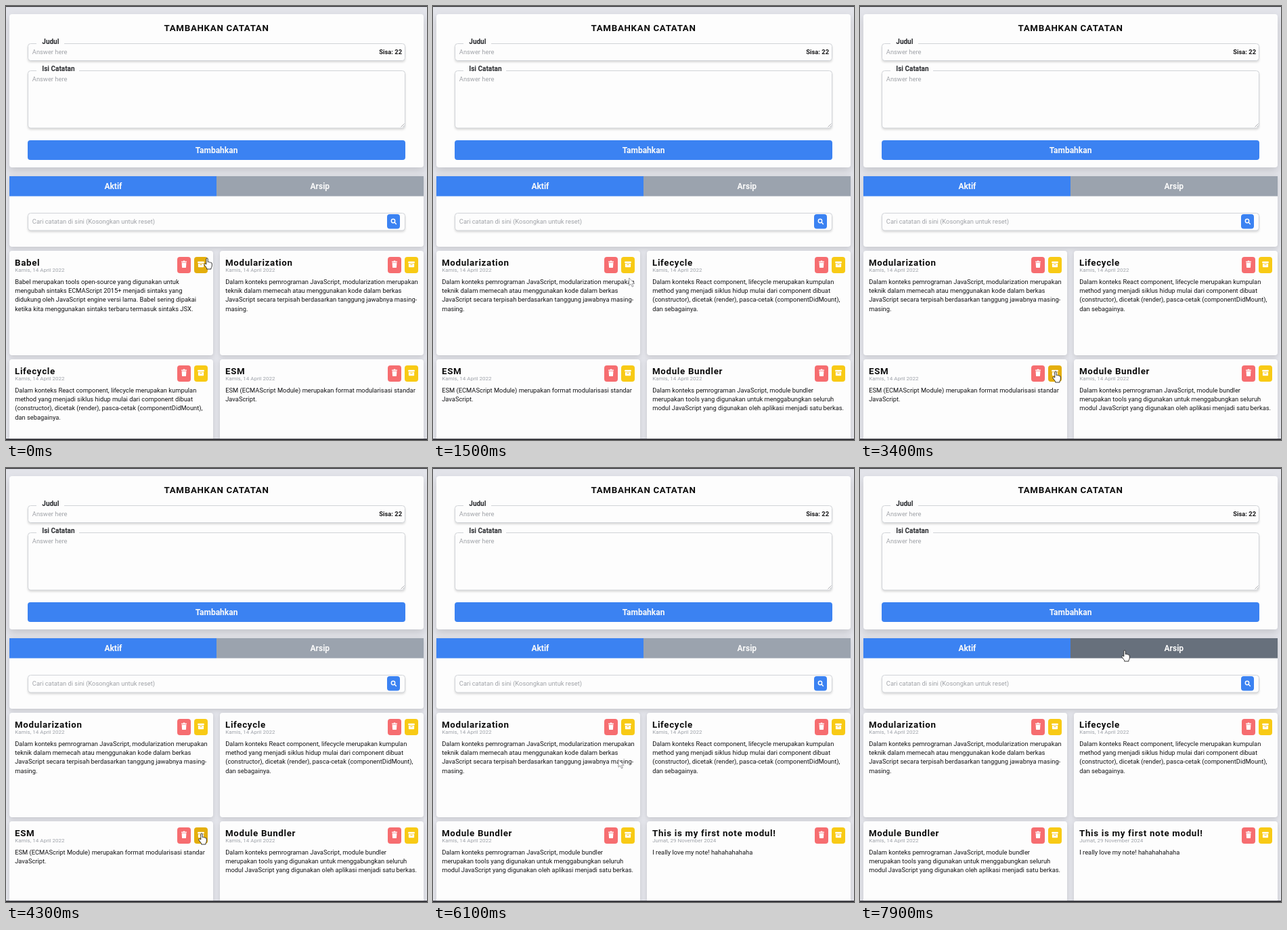
These frames come from a looping animation (622 by 640 pixels, 8 s). An HTML page:

```html
<!DOCTYPE html>
<html lang="id">
<head>
<meta charset="utf-8">
<title>Catatan</title>
<style>
  html, body { margin: 0; width: 100%; height: 100%; overflow: hidden; background: #e3e4ea; }
  svg { display: block; width: 622px; height: 640px; font-family: Roboto, Arial, sans-serif; }
  text { white-space: pre; }
  .panel { fill: #fdfdfd; filter: drop-shadow(0 2px 3px rgba(0, 0, 0, .13)); }
  .form { filter: drop-shadow(0 5px 6px rgba(0, 0, 0, .13)); }
  .field { fill: #fdfdfd; stroke: #d1d4d8; filter: drop-shadow(0 2px 1.5px rgba(0, 0, 0, .14)); }
  .gap { fill: #fdfdfd; }
  .title { font-size: 13.33px; font-weight: 700; letter-spacing: .667px; fill: #0c0c0c; }
  .label { font-size: 10px; font-weight: 700; fill: #26282c; }
  .count { font-size: 9.33px; font-weight: 700; fill: #18181a; }
  .hint { font-size: 9.35px; fill: #a0a3a8; }
  .date { font-size: 8px; fill: #9fa3aa; }
  .body { font-size: 9.35px; fill: #141416; }
  .button { font-size: 12px; font-weight: 700; fill: #fafafa; text-anchor: middle; }
  .blue { fill: #3b82f2; }
  .red { fill: #f66d70; }
  .yellow { fill: #f8ca15; }
  .yellow.hover { fill: #e4ae0c; }
  .tab { fill: #9ba3ae; }
  .tab.hover { fill: #67707c; }
</style>
</head>
<body>
<svg id="stage" viewBox="0 0 622 640">
  <defs>
    <g id="trash" fill="#fff">
      <path d="M-4-4.6h2.4l.6-.8h2l.6.8H4v1.3h-8z"/>
      <path d="M-3.4-2.5h6.8L3 4.2q-.1.9-1 .9h-4q-.9 0-1-.9z"/>
    </g>
    <g id="archive" fill="#fff">
      <rect x="-4.7" y="-4.2" width="9.4" height="2.4" rx=".4"/>
      <path d="M-4.1-1.1h8.2v4.7q0 .7-.7.7h-6.8q-.7 0-.7-.7zM-1.6.1v.9h3.2v-.9z" fill-rule="evenodd"/>
    </g>
  </defs>

  <rect class="panel form" x="5" y="12" width="612" height="226" rx="4"/>
  <text class="title" x="233.6" y="37">TAMBAHKAN CATATAN</text>

  <rect class="field" x="32.5" y="55.5" width="557" height="25" rx="4"/>
  <rect class="gap" x="45" y="50" width="41" height="9"/>
  <text class="label" x="53.3" y="56">Judul</text>
  <text class="hint" x="38.8" y="71">Answer here</text>
  <text class="count" x="585" y="71" text-anchor="end">Sisa: 22</text>

  <rect class="field" x="32.5" y="95.5" width="557" height="84.5" rx="4"/>
  <rect class="gap" x="45" y="90" width="63" height="9"/>
  <text class="label" x="53.3" y="96">Isi Catatan</text>
  <text class="hint" x="38.8" y="111">Answer here</text>
  <path d="M583.5 178.5l5-5M586.5 178.5l2-2" stroke="#8a8c90" stroke-width=".7"/>

  <rect class="blue" x="32" y="198" width="558" height="29" rx="4"/>
  <text class="button" x="311" y="217">Tambahkan</text>

  <path class="panel" d="M5 251h612v100q0 4-4 4H9q-4 0-4-4z"/>
  <rect class="blue" x="5" y="251" width="306" height="29.5"/>
  <rect class="tab" id="tab" x="311" y="251" width="306" height="29.5"/>
  <text class="button" x="158.4" y="270">Aktif</text>
  <text class="button" x="463.8" y="270">Arsip</text>

  <rect class="field" x="32.5" y="305.5" width="557" height="25.5" rx="4"/>
  <text class="hint" x="38.8" y="321">Cari catatan di sini (Kosongkan untuk reset)</text>
  <rect class="blue" x="563" y="307" width="19" height="21.5" rx="4"/>
  <g fill="none" stroke="#fff" stroke-width="1.4" stroke-linecap="round">
    <circle cx="572" cy="317" r="2.7"/><path d="M574.1 319.1l2.3 2.3"/>
  </g>

  <g id="cards"></g>

  <rect width="622" height="1.2" fill="#26262a"/>
  <rect y="638" width="622" height="2" fill="#3c3c42"/>

  <g id="pointer" stroke="#222" stroke-width=".9" stroke-linejoin="round" fill="#fff">
    <path id="arrow" d="M0 0V11.2L2.6 8.8L4.5 13L6.3 12.2L4.5 8.2H8z" stroke="#77777c" stroke-width=".7"/>
    <path id="hand" d="M-1.2 9V1.1Q-1.1-.2 0-.2Q1.1-.2 1.2 1.1V5.6Q2.6 4.6 3.4 6Q4.8 5.2 5.5 6.6Q7.3 6.2 7.3 8V11.2Q7 13.5 6 14.4V16H-.4V14.6L-4.1 9.7Q-4.6 8.3-3.3 8Q-2.3 7.9-1.2 9z"/>
  </g>
</svg>

<script>
const LOOP = 8000, STEP = 100;
const april = 'Kamis, 14 April 2022';

// "until" is the time at which a note is archived
const notes = [
  { title: 'Babel', date: april, until: 400, lines: [
    'Babel merupakan tools open-source yang digunakan untuk',
    'mengubah sintaks ECMAScript 2015+ menjadi sintaks yang',
    'didukung oleh JavaScript engine versi lama. Babel sering dipakai',
    'ketika kita menggunakan sintaks terbaru termasuk sintaks JSX.'] },
  { title: 'Modularization', date: april, lines: [
    'Dalam konteks pemrograman JavaScript, modularization merupakan',
    'teknik dalam memecah atau menggunakan kode dalam berkas',
    'JavaScript secara terpisah berdasarkan tanggung jawabnya masing-',
    'masing.'] },
  { title: 'Lifecycle', date: april, lines: [
    'Dalam konteks React component, lifecycle merupakan kumpulan',
    'method yang menjadi siklus hidup mulai dari component dibuat',
    '(constructor), dicetak (render), pasca-cetak (componentDidMount),',
    'dan sebagainya.'] },
  { title: 'ESM', date: april, until: 5300, lines: [
    'ESM (ECMAScript Module) merupakan format modularisasi standar',
    'JavaScript.'] },
  { title: 'Module Bundler', date: april, lines: [
    'Dalam konteks pemrograman JavaScript, module bundler',
    'merupakan tools yang digunakan untuk menggabungkan seluruh',
    'modul JavaScript yang digunakan oleh aplikasi menjadi satu berkas.'] },
  { title: 'This is my first note modul!', date: 'Jumat, 29 November 2024', lines: [
    'I really love my note! hahahahahaha'] },
];

// time, x, y of the pointer tip
const path = [
  [0, 297, 372], [1200, 297, 372], [2000, 274, 464], [2500, 274, 464],
  [3200, 289, 539], [5400, 289, 539], [6000, 274, 430], [6600, 274, 430],
  [7600, 391, 269], [8000, 391, 269],
];

const $ = id => document.getElementById(id);
const slots = [[5, 361], [316, 361], [5, 521], [316, 521]];
const ease = p => p * p * (3 - 2 * p);
const inside = (x, y, left, top, w, h) => x >= left && x <= left + w && y >= top && y <= top + h;

function cardMarkup(note, [x, y]) {
  const lines = note.lines.map((line, i) =>
    `<text class="body" x="8.2" y="${Math.floor(49 + i * 13.34)}">${line}</text>`).join('');
  return `<g transform="translate(${x} ${y})">
    <rect class="panel" width="301" height="154" rx="4"/>
    <text class="title" x="8" y="22">${note.title}</text>
    <text class="date" x="8.2" y="31">${note.date}</text>${lines}
    <rect class="red" x="248" y="9" width="20" height="24" rx="4"/>
    <use href="#trash" x="258" y="20"/>
    <rect class="yellow" x="273" y="9" width="20" height="24" rx="4"/>
    <use href="#archive" x="283" y="20"/>
  </g>`;
}

function pointerAt(t) {
  const i = path.findIndex(([time]) => time > t);
  const [t0, x0, y0] = path[i - 1], [t1, x1, y1] = path[i];
  const p = ease((t - t0) / (t1 - t0));
  return [x0 + (x1 - x0) * p, y0 + (y1 - y0) * p];
}

let shownKey = '';
function draw(t) {
  const shown = notes.filter(n => !(t >= n.until)).slice(0, 4);
  const key = shown.map(n => n.title).join();
  if (key !== shownKey) {
    $('cards').innerHTML = shown.map((n, i) => cardMarkup(n, slots[i])).join('');
    shownKey = key;
  }

  const [x, y] = pointerAt(t);
  const onTab = inside(x, y, 311, 251, 306, 29.5);
  let onButton = false;
  $('tab').classList.toggle('hover', onTab);
  document.querySelectorAll('.yellow').forEach((button, i) => {
    const over = inside(x, y, slots[i][0] + 273, slots[i][1] + 9, 20, 24);
    button.classList.toggle('hover', over);
    onButton = onButton || over;
  });

  const hand = onTab || onButton;
  $('hand').style.display = hand ? '' : 'none';
  $('arrow').style.display = hand ? 'none' : '';
  $('pointer').setAttribute('transform', `translate(${x} ${y})`);
}

const start = performance.now();
function tick() {
  const t = (performance.now() - start) % LOOP;
  draw(Math.floor(t / STEP) * STEP);
  requestAnimationFrame(tick);
}
tick();
</script>
</body>
</html>
```
